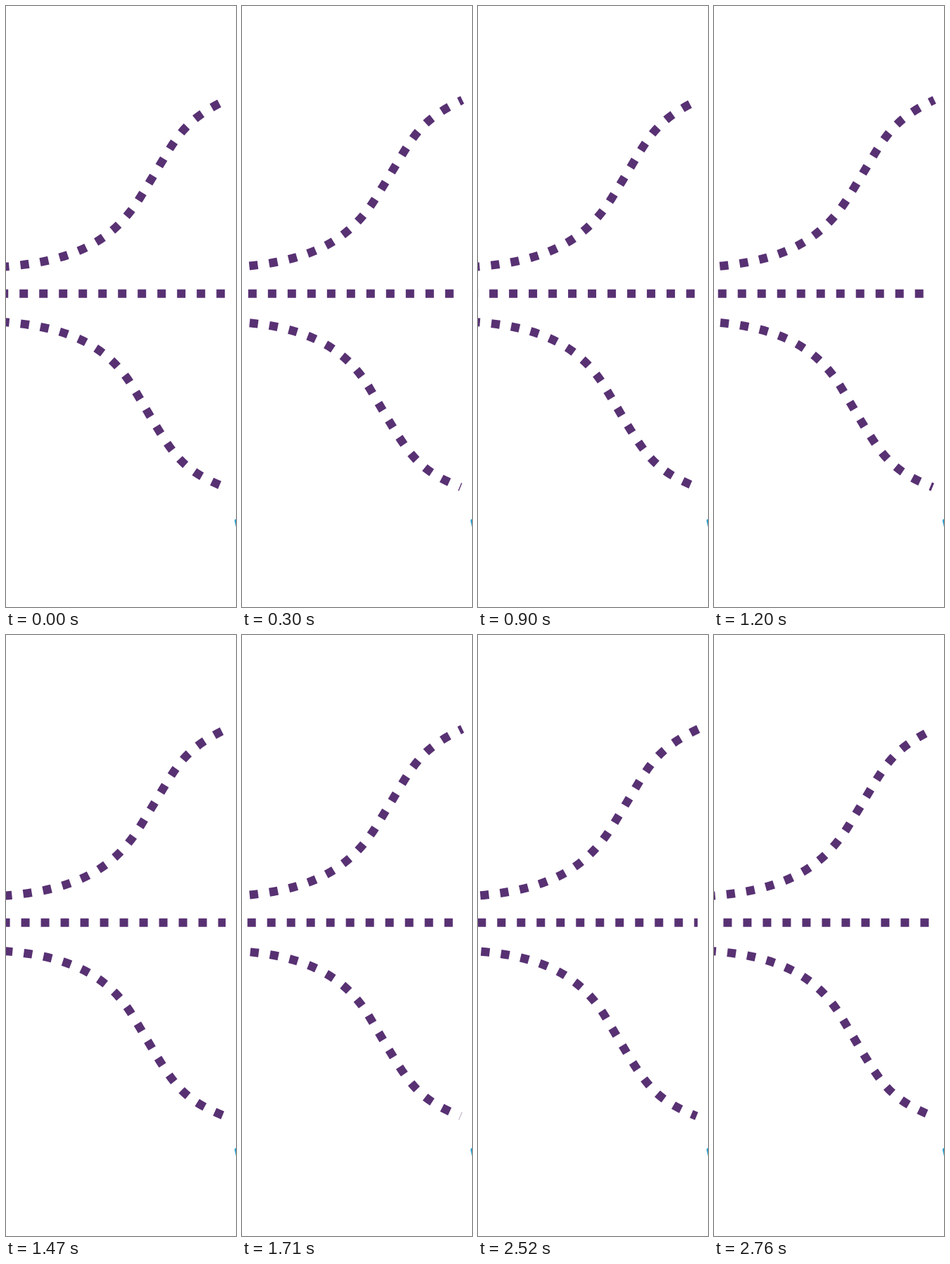
An HTML page with a canvas that plays this animation: 327 px wide and 852 px high, repeating every 2.79 s.

```html
<!DOCTYPE html>
<html lang="en">
<head>
<meta charset="utf-8">
<title>Dashed flow</title>
<style>
  html, body { margin: 0; width: 100%; height: 100%; overflow: hidden; background: #fff; }
  canvas { display: block; width: 327px; height: 852px; }
</style>
</head>
<body>
<canvas id="stage"></canvas>
<script>
const W = 327, H = 852, LOOP = 2790, STEP = 30;
const canvas = document.getElementById('stage');
const ctx = canvas.getContext('2d');
const dpr = window.devicePixelRatio || 1;
canvas.width = Math.round(W * dpr);
canvas.height = Math.round(H * dpr);

// Each path runs from its right end to the left.
// scale: dash size relative to 12 on, 16 off
// start: distance from the right end to a dash's rear edge at time 0
// speed: pixels per step towards the right end
const lines = [
  {
    path: new Path2D('M313.2 133.2 C250 163.5 242.6 187 206 246.5 L191 271 C153.9 330.4 100.8 363.6 -14 370.5'),
    scale: 1.0125, start: 23.3, speed: 1.819
  },
  {
    path: new Path2D('M312.3 407.7 H-14'),
    scale: 1, start: 13.1, speed: 1.763
  },
  {
    path: new Path2D('M310.7 682 C253 658.8 239.8 639.9 203 578.1 L181.5 542 C145.7 481.9 87.8 452.7 -14 447.4'),
    scale: 1.0125, start: 19.6, speed: 1.829
  }
];
const corner = new Path2D('M327 727 L325.5 728 L324.9 730 L327 739 Z');

function draw(time) {
  const step = Math.floor((time % LOOP) / STEP);
  ctx.setTransform(dpr, 0, 0, dpr, 0, 0);
  ctx.fillStyle = '#fff';
  ctx.fillRect(0, 0, W, H);
  ctx.strokeStyle = '#583173';
  ctx.lineWidth = 12;
  for (const { path, scale, start, speed } of lines) {
    const dash = 12 * scale, gap = 16 * scale;
    ctx.setLineDash([dash, gap]);
    ctx.lineDashOffset = (dash - start + speed * step) % (dash + gap);
    ctx.stroke(path);
  }
  ctx.fillStyle = '#2ba0cf';
  ctx.fill(corner);
}

const origin = performance.now();
function tick() {
  draw(performance.now() - origin);
  requestAnimationFrame(tick);
}
tick();
</script>
</body>
</html>
```
